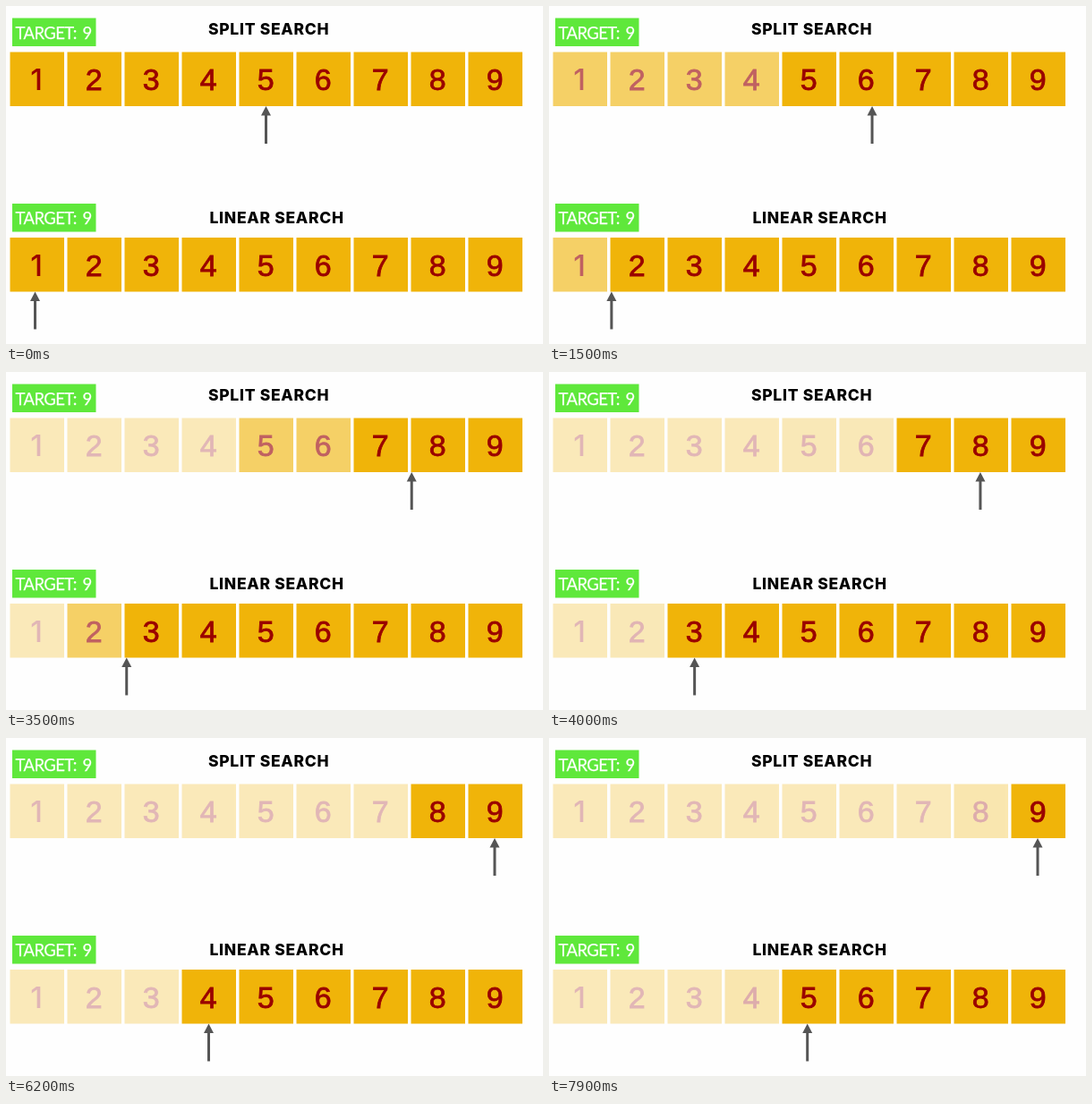
These frames come from a looping animation (600 by 378 pixels, 8000 ms). An HTML page:

```html
<!DOCTYPE html>
<html lang="en">
<head>
<meta charset="utf-8">
<title>Split and linear search</title>
<style>
html, body { margin: 0; width: 100%; height: 100%; overflow: hidden; background: #fefefe; }
svg { display: block; width: 100%; height: 100%; }
.title { font: 800 17.5px Inter, sans-serif; letter-spacing: .7px; fill: #000; }
.label { font: 400 18.5px Lato, sans-serif; letter-spacing: -.6px; word-spacing: 2.6px; fill: #fff; stroke: #fff; stroke-width: .25; }
.digit { font: 400 34px "Liberation Sans", sans-serif; text-anchor: middle; fill: #9a0000; stroke: #9a0000; stroke-width: .8; }
.plain { font: 500 33px Inter, sans-serif; stroke: none; }
</style>
</head>
<body>
<svg id="stage" viewBox="0 0 600 378"></svg>
<script>
const LOOP = 8000, PERIOD = 2000, START = 877, MOVE = 1200;
const COUNT = 9, PITCH = 64, SIZE = 60.5, DIM = 0.28;
const stage = document.getElementById('stage');

// stops: arrow positions; cuts: how many tiles are dimmed after each step
const rows = [
  { title: 'SPLIT SEARCH', titleX: 226, titleY: 32, y: 0,
    stops: [290.5, 417, 482, 546, 546], cuts: [0, 4, 6, 7, 8] },
  { title: 'LINEAR SEARCH', titleX: 227.5, titleY: 35.7, y: 207.5,
    stops: [32.5, 99.5, 162.7, 226.5, 289.5], cuts: [0, 1, 2, 3, 4] }
];

function add(parent, tag, attrs, text) {
  const node = document.createElementNS('http://www.w3.org/2000/svg', tag);
  for (const key in attrs) node.setAttribute(key, attrs[key]);
  if (text !== undefined) node.textContent = text;
  return parent.appendChild(node);
}

function build(row) {
  const g = add(stage, 'g', { transform: `translate(0 ${row.y})` });
  add(g, 'rect', { x: 7, y: 13.5, width: 93.5, height: 31.5, fill: '#5fe83b' });
  add(g, 'text', { x: 10.5, y: 36.5, class: 'label' }, 'TARGET: 9');
  add(g, 'text', { x: row.titleX, y: row.titleY, class: 'title' }, row.title);
  row.tiles = Array.from({ length: COUNT }, (_, i) => {
    const tile = add(g, 'g', { transform: `translate(${4.5 + i * PITCH} 51.5)` });
    add(tile, 'rect', { width: SIZE, height: SIZE, fill: '#f0b409' });
    // the 1 has no foot
    add(tile, 'text', { x: 29.7, y: 42.8, class: i ? 'digit' : 'digit plain' }, i + 1);
    return tile;
  });
  row.arrow = add(g, 'path', {
    d: 'M0 112L5.5 122.5H1.5V154H-1.5V122.5H-5.5Z', fill: '#555'
  });
}

const clamp = v => Math.min(1, Math.max(0, v));
const easeCubic = p => p < 0.5 ? 4 * p ** 3 : 1 - 4 * (1 - p) ** 3;
const easeSine = p => (1 - Math.cos(Math.PI * p)) / 2;

function render(time) {
  // each move runs slightly past its period, so steps are counted from START
  const since = Math.max(0, time - START);
  const step = Math.floor(since / PERIOD);
  const p = clamp((since - step * PERIOD) / MOVE);
  const slide = easeCubic(p);
  const faded = 1 - (1 - DIM) * easeSine(p);
  for (const { stops, cuts, tiles, arrow } of rows) {
    const x = stops[step] + (stops[step + 1] - stops[step]) * slide;
    arrow.setAttribute('transform', `translate(${x} 0)`);
    tiles.forEach((tile, i) => {
      const alpha = i < cuts[step] ? DIM : i < cuts[step + 1] ? faded : 1;
      tile.setAttribute('opacity', alpha);
    });
  }
}

rows.forEach(build);
const origin = performance.now();
function tick() {
  render((performance.now() - origin) % LOOP);
  requestAnimationFrame(tick);
}
tick();
</script>
</body>
</html>
```
